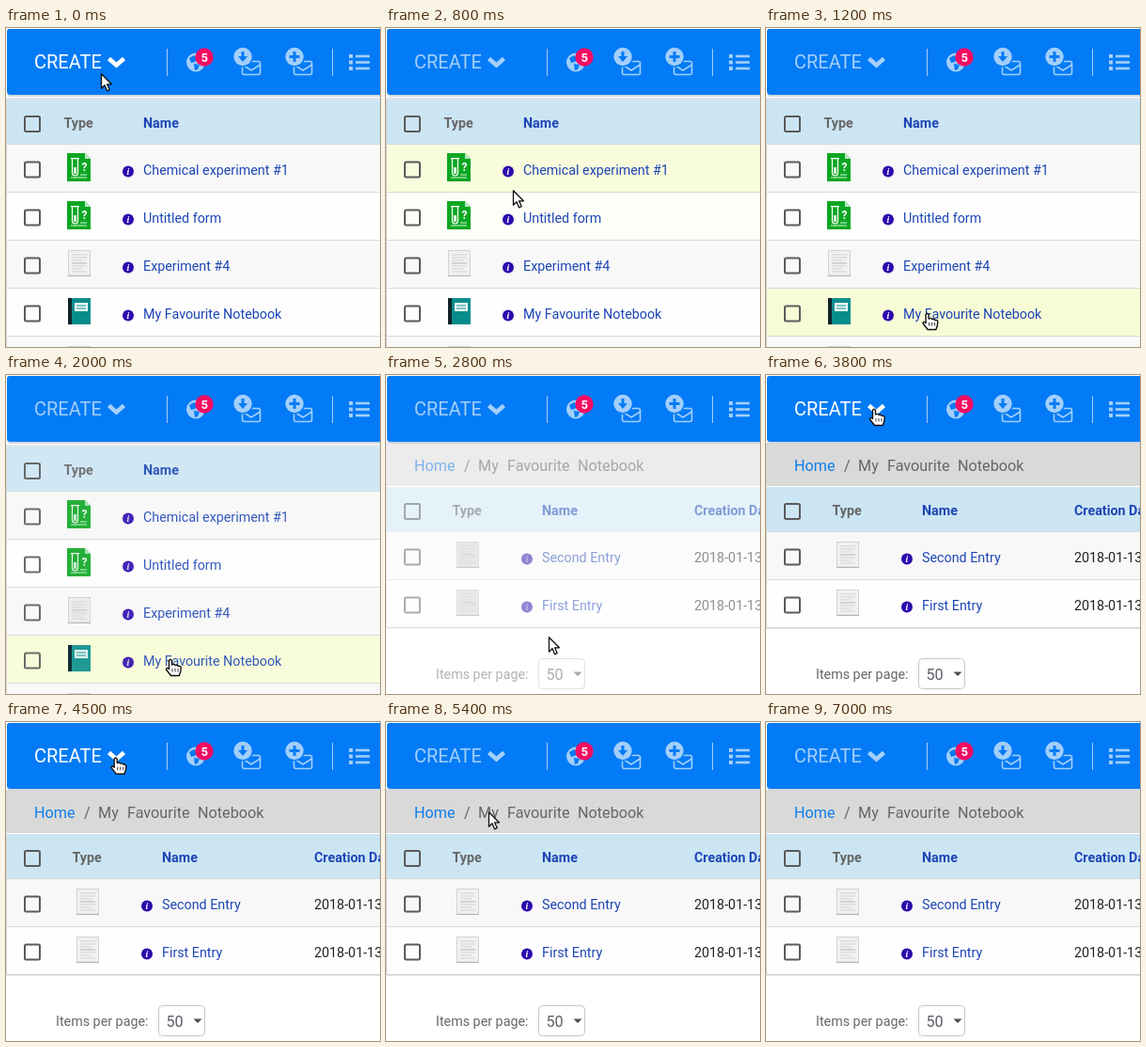
An HTML page with a canvas for the animation above (7.1 s loop, 398 by 339 pixels).

```html
<!DOCTYPE html>
<html lang="en">
<head>
<meta charset="utf-8">
<title>Inventory list</title>
<style>
html, body { margin: 0; width: 398px; height: 339px; overflow: hidden; background: #fff; }
canvas { display: block; }
</style>
</head>
<body>
<canvas id="stage" width="398" height="339"></canvas>
<script>
const ctx = document.getElementById('stage').getContext('2d');
const LOOP = 7100, STEP = 100;
const LINK = '#1d46b5', GREY = '#666', BLUE = '#037bf6';

// Pointer hot spot: time, x, y
const PATH = [
  [0, 101, 48], [200, 101, 48], [400, 104, 62], [500, 104, 62],
  [800, 135, 172], [1250, 173, 306], [1500, 175, 302], [2400, 175, 302],
  [2800, 173, 278], [3100, 168, 245], [3700, 115, 36], [4200, 115, 36],
  [4600, 117, 38], [4700, 117, 38], [5400, 109, 95], [5500, 110, 95],
  [6400, 232, 97], [6900, 404, 40], [7100, 404, 40]
];

const clamp = v => Math.max(0, Math.min(1, v));
const ease = v => (v = clamp(v), v * v * (3 - 2 * v));

function slope(i, k) {
  const a = PATH[i - 1], b = PATH[i], c = PATH[i + 1];
  if (!a || !c) return 0;
  const s = (b[k] - a[k]) / (b[0] - a[0]), e = (c[k] - b[k]) / (c[0] - b[0]);
  return s * e <= 0 ? 0 : 2 * s * e / (s + e);
}

function pointer(t) {
  t = Math.max(0, Math.min(LOOP - 1, t));
  let i = 0;
  while (t >= PATH[i + 1][0]) i++;
  const a = PATH[i], b = PATH[i + 1], d = b[0] - a[0], u = (t - a[0]) / d;
  return [1, 2].map(k => a[k] + (b[k] - a[k]) * u * u * (3 - 2 * u)
    + d * (slope(i, k) * u * (1 - u) ** 2 - slope(i + 1, k) * u * u * (1 - u)));
}

const inside = ([x, y], l, t, r, b) => x >= l && x < r && y >= t && y < b;

// Hover strength, eased by averaging the recent past
function hover(t, l, top, r, b) {
  let n = 0;
  for (let k = 0; k < 6; k++) n += inside(pointer(t - k * 20), l, top, r, b);
  return n / 6;
}

function rect(x, y, w, h, fill) {
  ctx.fillStyle = fill;
  ctx.fillRect(x, y, w, h);
}

function round(x, y, w, h, r) {
  ctx.beginPath();
  ctx.roundRect(x, y, w, h, r);
}

function disc(x, y, r, fill) {
  ctx.beginPath();
  ctx.arc(x, y, r, 0, 7);
  ctx.fillStyle = fill;
  ctx.fill();
}

function line(pts, color, width) {
  ctx.beginPath();
  pts.forEach(([x, y]) => ctx.lineTo(x, y));
  ctx.strokeStyle = color;
  ctx.lineWidth = width;
  ctx.stroke();
}

function poly(pts, fill) {
  ctx.beginPath();
  pts.forEach(([x, y]) => ctx.lineTo(x, y));
  ctx.closePath();
  ctx.fillStyle = fill;
  ctx.fill();
}

function text(s, x, y, color, size = 14.3, weight = 400) {
  ctx.font = `${weight} ${size}px Roboto, sans-serif`;
  ctx.fillStyle = color;
  ctx.fillText(s, x, y);
}

function at(x, y, draw) {
  ctx.save();
  ctx.translate(x, y);
  draw();
  ctx.restore();
}

function checkbox(x, y) {
  round(x - 8, y - 8, 16, 16, 1.5);
  ctx.strokeStyle = '#5a5a5a';
  ctx.lineWidth = 2;
  ctx.stroke();
}

function info(x, y) {
  disc(x, y, 6, '#2c0aad');
  ctx.font = 'italic bold 10px "Liberation Serif", serif';
  ctx.fillStyle = '#fff';
  ctx.fillText('i', x - 1.6, y + 3.5);
}

function formIcon() {
  poly([[0, 0], [19, 0], [25, 6], [25, 30], [0, 30]], '#0ba722');
  poly([[19, 0], [25, 6], [19, 6]], '#b5e5bb');
  ctx.beginPath();
  ctx.moveTo(5.5, 6);
  ctx.lineTo(5.5, 21);
  ctx.arc(8.5, 21, 3, Math.PI, 0, true);
  ctx.lineTo(11.5, 6);
  ctx.strokeStyle = '#fff';
  ctx.lineWidth = 1.2;
  ctx.stroke();
  rect(4, 5, 9, 1.3, '#fff');
  rect(7, 15, 3, 7, '#d8f4dc');
  text('?', 15.5, 19, '#fff', 12, 700);
  rect(4, 25.5, 17, 1, '#d8f4dc');
  rect(14, 22.5, 7, 1, '#d8f4dc');
}

function docIcon() {
  rect(0, 0, 24, 28, '#c6c6c6');
  rect(0.7, 0.7, 22.6, 26, '#f1f1f1');
  for (let k = 0; k < 7; k++) rect(4, 4.5 + k * 3, k % 3 === 2 ? 12 : 16, 0.9, k === 3 ? '#b0b0b0' : '#d0d0d0');
  rect(0, 27, 24, 1, '#b4b4b4');
}

function bookIcon() {
  rect(0, 0, 24, 28, '#078d8c');
  rect(0, 0, 4, 28, '#10222a');
  rect(7, 5, 14, 9, '#f5fbfb');
  rect(9, 7.5, 10, 1, '#078d8c');
  rect(9, 10.5, 10, 1, '#078d8c');
}

function row(t, y, h, fill, right) {
  rect(1, y, 397, h, fill);
  const heat = hover(t, 1, y - 4, right, y + h - 3);
  if (heat) rect(1, y, 397, h, `rgba(248,252,214,${heat})`);
  rect(1, y + h - 1, 397, 1, '#dadadc');
}

const HOME = [
  ['Chemical experiment #1', formIcon, 65, 133],
  ['Untitled form', formIcon, 65, 184],
  ['Experiment #4', docIcon, 66, 236],
  ['My Favourite Notebook', bookIcon, 66, 287]
];

function homePage(t) {
  rect(0, 74, 398, 2, '#e1e3e6');
  rect(1, 76, 397, 47, '#cce5f3');
  rect(0, 76, 1, 263, '#d6d6d6');
  rect(1, 123, 397, 1, '#cfd9df');
  checkbox(28, 102);
  text('Type', 61.5, 106, GREY, 14.3, 700);
  text('Name', 146, 106, LINK, 14.3, 700);
  HOME.forEach(([name, icon, x, y], i) => {
    const top = 124 + i * 51;
    row(t, top, 51, i % 2 ? '#fefefe' : '#f8f8f8', 398);
    checkbox(28, top + 26.5);
    at(x, y, icon);
    info(130, top + 28.5);
    text(name, 146, top + 32, LINK);
  });
  rect(1, 328, 397, 11, '#f8f8f8');
  at(66, 338, docIcon);
}

function bookPage(t) {
  rect(0, 72, 398, 46, '#d9d9d9');
  text('Home', 30, 102, '#0d7de8', 16.2);
  text('/', 83, 102, GREY, 16.2);
  text('My', 98, 102, GREY, 16.2);
  text('Favourite', 129, 102, GREY, 16.2);
  text('Notebook', 204, 102, GREY, 16.2);
  rect(1, 119, 397, 47, '#cce5f3');
  rect(1, 166, 397, 1, '#cfd9df');
  checkbox(28, 145);
  text('Type', 70.5, 149, GREY, 14.3, 700);
  text('Name', 166, 149, LINK, 14.3, 700);
  text('Creation Date', 328, 149, LINK, 14.3, 700);
  ['Second Entry', 'First Entry'].forEach((name, i) => {
    const top = 167 + i * 51;
    row(t, top, 51, i ? '#fefefe' : '#f8f8f8', 398);
    checkbox(28, top + 26.5);
    at(75, top + 10, docIcon);
    info(150, top + 28.5);
    text(name, 166, top + 32, LINK);
    text('2018-01-13', 328, top + 32, '#222');
  });
  rect(0, 119, 1, 150, '#d6d6d6');
  rect(1, 268, 397, 1.5, '#cfcfcf');
  text('Items per page:', 53, 323, GREY);
  round(162.5, 301.5, 49, 32, 4);
  ctx.strokeStyle = '#c4c6ca';
  ctx.lineWidth = 1;
  ctx.stroke();
  text('50', 170.5, 324, '#5b6066', 16.2);
  poly([[199.5, 315.5], [208.5, 315.5], [204, 320]], '#4d4d4d');
}

function mailIcon(x, ex, plus) {
  const c = '#a2cffa';
  round(ex, 35.5, 19, 14, 2);
  ctx.strokeStyle = c;
  ctx.lineWidth = 1.6;
  ctx.stroke();
  line([[ex, 39], [ex + 9.5, 45], [ex + 19, 39]], c, 1.6);
  disc(x, 30.5, 11, BLUE);
  disc(x, 30.5, 9.7, c);
  rect(x - 1.5, 25, 3, plus ? 11 : 6, BLUE);
  if (plus) rect(x - 5.5, 29, 11, 3, BLUE);
  else poly([[x - 5, 30], [x + 5, 30], [x, 36]], BLUE);
}

function toolbar(t) {
  const c = '#a2cffa';
  round(1, 1, 400, 72, [3, 0, 0, 4]);
  ctx.fillStyle = '#cfd6de';
  ctx.fill();
  round(1, 1, 400, 70, [3, 0, 0, 4]);
  ctx.fillStyle = BLUE;
  ctx.fill();

  const glow = `rgba(255,255,255,${0.64 + 0.36 * hover(t, 26, 20, 132, 52)})`;
  text('CREATE', 30, 43, glow, 20);
  line([[109.5, 32.5], [117.5, 39.5], [125.5, 32.5]], glow, 4.6);
  rect(171, 22, 1, 29, c);
  rect(347, 22, 1, 29, c);

  disc(202, 36.5, 10, c);
  poly([[195, 32], [200, 29], [204, 32], [201, 36], [197, 37]], BLUE);
  poly([[200, 38], [206, 39], [204, 44], [201, 45]], BLUE);
  disc(211, 31, 9.7, '#f40c62');
  text('5', 207.5, 35.5, '#fff', 13, 700);

  mailIcon(252, 251.5, false);
  mailIcon(307, 306.5, true);
  for (let k = 0; k < 3; k++) {
    rect(365, 28 + k * 6.5, 4, 4, c);
    rect(372, 28.7 + k * 6.5, 15, 2.6, c);
  }
}

function outline(width) {
  ctx.lineJoin = 'round';
  ctx.lineWidth = width;
  ctx.strokeStyle = '#111';
  ctx.stroke();
  ctx.lineJoin = 'miter';
}

function arrow() {
  poly([[0.5, 0.8], [0.5, 16.2], [4, 12.8], [6.6, 18.8], [9.2, 17.6], [6.6, 11.8], [11.4, 11.8]], '#fff');
  outline(1.3);
}

function hand() {
  ctx.beginPath();
  ctx.moveTo(-1.5, 10);
  ctx.lineTo(-1.5, 1.5);
  ctx.quadraticCurveTo(0, -1, 1.5, 1.5);
  ctx.lineTo(1.5, 6);
  ctx.quadraticCurveTo(4, 4.5, 5, 6.5);
  ctx.quadraticCurveTo(7.5, 5.5, 8.3, 7.5);
  ctx.quadraticCurveTo(11.2, 6.8, 11.2, 9.5);
  ctx.lineTo(10.8, 13);
  ctx.lineTo(9.3, 17.5);
  ctx.lineTo(0.5, 17.5);
  ctx.lineTo(-4.5, 11);
  ctx.quadraticCurveTo(-4.6, 8, -1.5, 10.5);
  ctx.closePath();
  ctx.fillStyle = '#fff';
  ctx.fill();
  outline(1.4);
  for (const x of [2, 5, 8]) line([[x, 10], [x, 13.5]], '#222', 0.9);
}

function isHand(t, p) {
  if (inside(p, 28, 22, 132, 47)) return true;
  if (t < 2400) return inside(p, 146, 295, 293, 312) || inside(p, 146, 244, 238, 261);
  return t > 2600 && (inside(p, 166, 187, 249, 203) || inside(p, 166, 238, 230, 254) || inside(p, 30, 88, 74, 105));
}

function draw(t) {
  rect(0, 0, 398, 339, '#fff');
  if (t < 2400) {
    ctx.globalAlpha = 1 - ease((t - 1900) / 500);
    homePage(t);
  } else {
    ctx.globalAlpha = ease((t - 2500) / 600);
    bookPage(t);
  }
  ctx.globalAlpha = 1;
  toolbar(t);
  const p = pointer(t);
  at(p[0], p[1], isHand(t, p) ? hand : arrow);
}

const start = performance.now();
function tick() {
  const t = (performance.now() - start) % LOOP;
  draw(Math.floor(t / STEP) * STEP);
  requestAnimationFrame(tick);
}
tick();
</script>
</body>
</html>
```
